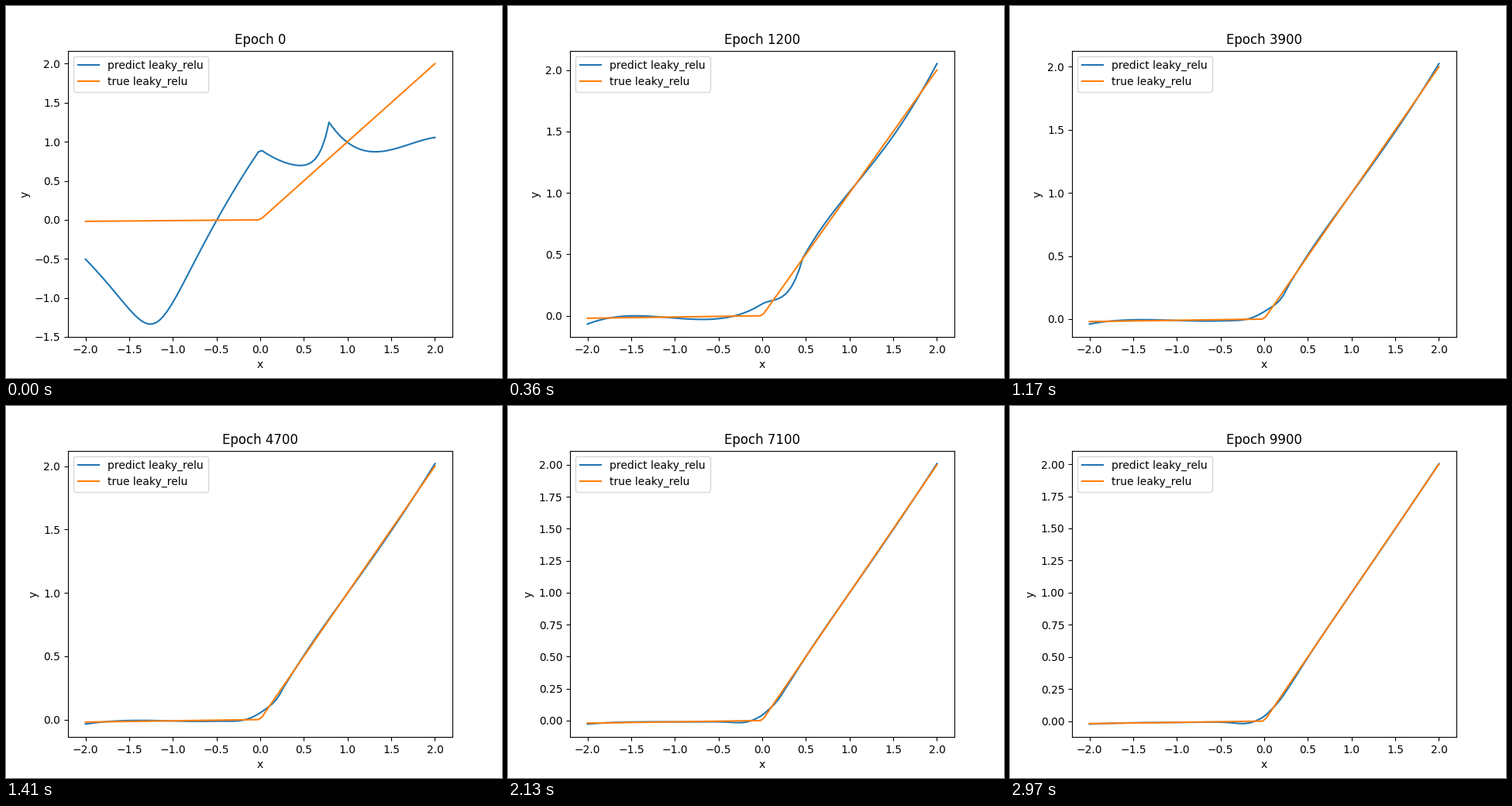
Write a matplotlib script that moves like this. It is 640 px wide and 480 px high and loops after 3 s.

```python
import numpy as np
import matplotlib.pyplot as plt
from matplotlib.animation import FuncAnimation

FRAMES, INTERVAL, EPOCH_STEP = 100, 30, 100
KINK = 0.788  # where the untrained curve has its cusp

x = np.linspace(-2, 2, 100)
true = np.where(x > 0, x, 0.01 * x)


def untrained(v):
    """Dip on the left, sagging arc up to the cusp, shallow bowl after it."""
    dip = (0.903 + 1.636 * v - 0.38 * v ** 2
           + 4.3 * 0.105 * np.logaddexp(0, -(v + 1.213) / 0.105))
    arc = 0.903 - 0.8 * v + 0.72 * v ** 2 + 0.53 * (np.abs(v) / KINK) ** 7.7
    u = v - KINK
    bowl = 1.25 - 1.656 * u + 2.197 * u ** 2 - 0.795 * u ** 3
    return np.select([v < 0, v < KINK], [dip, arc], bowl)


def ripple(kink):
    """Error of the roughly fitted curve: waves either side of the kink."""
    left = (0.157 + 0.015 * x) * (x + 1.78) * (x + 1.04) * (x + 0.32)
    s = x / kink
    sag = (1 - s) * (0.093 - kink * s * (0.43 + 1.29 * s))
    r = (x - kink) / (2 - kink)
    right = (1.3 - 0.57 * r) * r * (r - 0.4) * (r - 0.87)
    return np.select([x < 0, x < kink], [left, sag], right)


def rounding():
    """Error that remains at the end: a softened corner at zero."""
    d = np.abs(x)
    slope = np.where(x < 0, 0.33, 0.28)
    width = np.where(x < 0, 0.25, 0.3)
    return (0.03 - slope * d) * np.exp(-(d / width) ** 2)


def predict(epoch):
    kink = 0.25 + (KINK - 0.25) * np.exp(-epoch / 1300)
    rough = np.exp((1200 - epoch) / 3300)
    fitted = true + rounding() + rough * (ripple(kink) - rounding())
    start = untrained(np.interp(x, [-2, 0, kink, 2], [-2, 0, KINK, 2]))
    return fitted + np.exp(-epoch / 230) * (start - fitted)


fig, ax = plt.subplots(figsize=(6.4, 4.8), dpi=100)


def draw(frame):
    epoch = frame * EPOCH_STEP
    ax.clear()
    ax.plot(x, predict(epoch), label="predict leaky_relu")
    ax.plot(x, true, label="true leaky_relu")
    ax.set_title(f"Epoch {epoch}")
    ax.set_xlabel("x")
    ax.set_ylabel("y")
    ax.legend(loc="upper left")


anim = FuncAnimation(fig, draw, frames=FRAMES, interval=INTERVAL,
                     repeat=True, repeat_delay=0)
plt.show()
```
